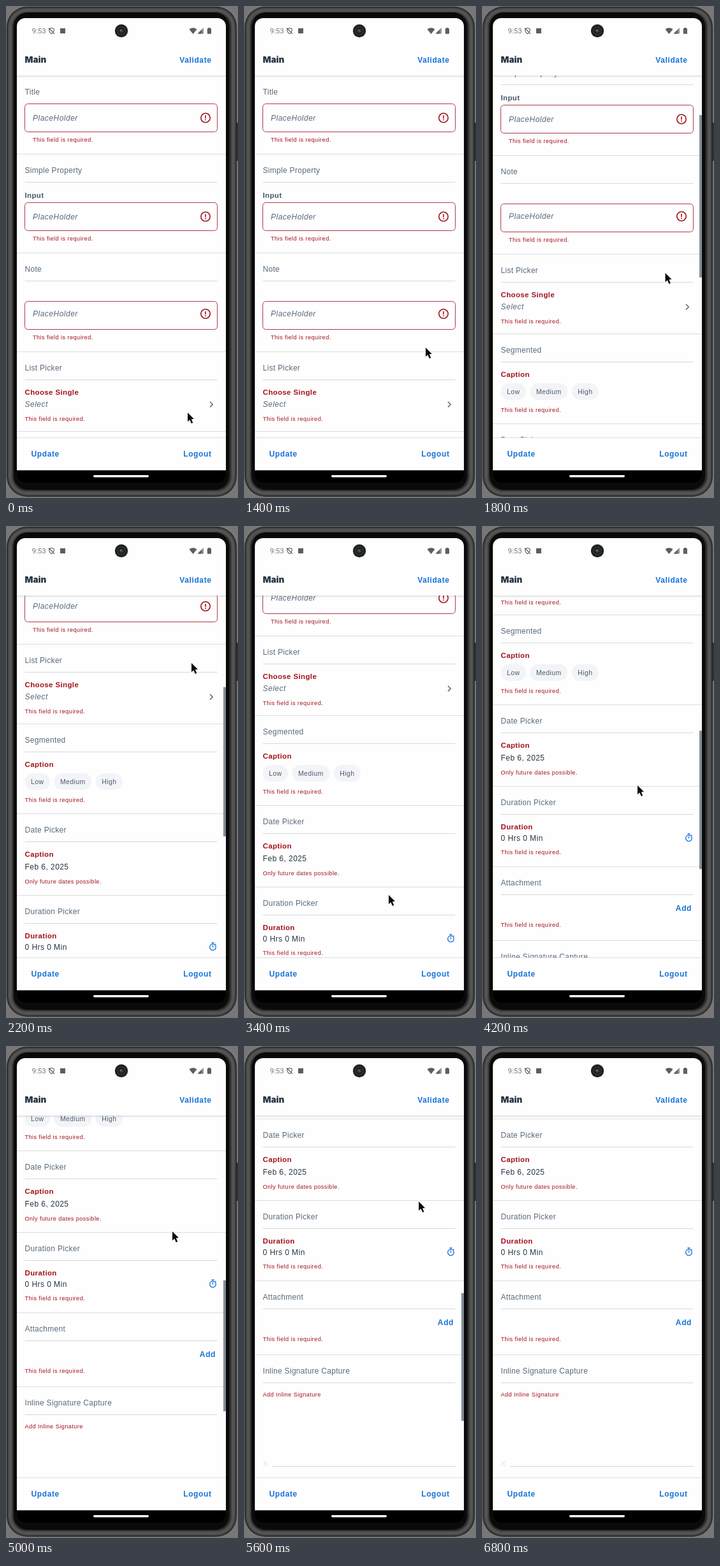
Write an HTML page with a canvas that moves like this. It is 364 by 772 pixels and loops after 8200 ms.

```html
<!DOCTYPE html>
<html lang="en">
<head>
<meta charset="utf-8">
<title>Form validation</title>
<style>
html, body { margin: 0; width: 100%; height: 100%; overflow: hidden; background: #777; }
canvas { display: block; width: 364px; height: 772px; }
</style>
</head>
<body>
<canvas id="stage"></canvas>
<script>
const W = 364, H = 772, LOOP = 8200, STEP = 200;
const LEFT = 17, WIDE = 328, PAD = 29.5, INNER = 302, TOP = 109, FOOT = 677;
const canvas = document.getElementById('stage');
const ctx = canvas.getContext('2d');
const dpr = window.devicePixelRatio || 1;
canvas.width = W * dpr;
canvas.height = H * dpr;

const RED = '#a2121c', BLUE = '#1672d6', INK = '#263442', SLATE = '#586a7c';
const GRAY = '#5c5f62', LINE = '#dcdde0';

const style = (size, spacing, look = '', family = '"Liberation Sans", Arial') =>
  ({ size, spacing: spacing + 'px', font: `${look} ${size}px ${family}, sans-serif` });
const TYPE = {
  head: style(13.5, 0, '900', 'Inter'),
  button: style(12, 0.6, 'bold'),
  title: style(12, 0.3),
  label: style(11.5, 0.37, 'bold'),
  value: style(12, 0.45),
  hint: style(12, 0.5, 'italic'),
  small: style(9.2, 0.43),
  pill: style(10.5, 0.4),
  clock: style(11.5, 0, '', 'Roboto')
};

// Pointer stops; "drag" means the button is held on the way there.
const STOPS = [
  { t: 0, x: 285, y: 638 },
  { t: 1400, x: 285, y: 536 },
  { t: 1500, x: 285, y: 572 },
  { t: 2200, x: 291, y: 215, drag: true },
  { t: 2400, x: 291, y: 215, drag: true },
  { t: 2600, x: 290, y: 202, drag: true },
  { t: 3400, x: 227, y: 579 },
  { t: 3600, x: 229, y: 565 },
  { t: 4200, x: 244, y: 407, drag: true },
  { t: 5000, x: 261, y: 291, drag: true },
  { t: 5400, x: 267, y: 241, drag: true },
  { t: 6700, x: 380, y: 290 }
];

const clamp = v => Math.min(1, Math.max(0, v));
const smooth = p => p * p * (3 - 2 * p);

// The page follows the pointer one to one while it drags.
function pose(time) {
  let { x, y } = STOPS[0], scroll = 0, lastDrag = -Infinity;
  STOPS.slice(1).forEach((stop, i) => {
    const from = STOPS[i];
    if (time < from.t) return;
    const p = clamp((time - from.t) / (stop.t - from.t));
    const k = stop.drag ? p : smooth(p);
    x = from.x + (stop.x - from.x) * k;
    y = from.y + (stop.y - from.y) * k;
    if (stop.drag) {
      scroll += from.y - y;
      lastDrag = Math.min(time, stop.t);
    }
  });
  return { x, y, scroll: Math.round(scroll), bar: clamp(1 - (time - lastDrag - 300) / 250) };
}

function rect(x, y, w, h, fill) {
  ctx.fillStyle = fill;
  ctx.fillRect(x, y, w, h);
}

function round(x, y, w, h, r, fill, stroke) {
  ctx.beginPath();
  ctx.roundRect(x, y, w, h, r);
  if (fill) { ctx.fillStyle = fill; ctx.fill(); }
  if (stroke) { ctx.strokeStyle = stroke; ctx.lineWidth = 1; ctx.stroke(); }
}

function circle(x, y, r, fill, stroke, width) {
  ctx.beginPath();
  ctx.arc(x, y, r, 0, Math.PI * 2);
  if (fill) { ctx.fillStyle = fill; ctx.fill(); }
  if (stroke) { ctx.strokeStyle = stroke; ctx.lineWidth = width; ctx.stroke(); }
}

function path(d, x, y, fill, stroke, width) {
  const p = new Path2D(d);
  ctx.save();
  ctx.translate(x, y);
  ctx.lineJoin = 'round';
  if (stroke) { ctx.strokeStyle = stroke; ctx.lineWidth = width; ctx.stroke(p); }
  if (fill) { ctx.fillStyle = fill; ctx.fill(p); }
  ctx.restore();
}

// y is the middle of the capitals
function text(str, x, y, type, color, align = 'left') {
  const { font, size, spacing } = TYPE[type];
  ctx.font = font;
  ctx.letterSpacing = spacing;
  ctx.fillStyle = color;
  ctx.textAlign = align;
  ctx.fillText(str, x, y + size * 0.36);
}

const label = str => text(str, PAD, 64, 'label', RED);
const value = (str, y) => text(str, PAD, y, 'value', INK);
const error = (y, str = 'This field is required.', x = PAD) => text(str, x, y, 'small', RED);

function field(y, mid = y + 22.5) {
  round(PAD, y + 0.5, INNER, 44, 5, null, '#ad3a4c');
  text('PlaceHolder', 42, mid, 'hint', SLATE);
  circle(313, mid, 7.2, null, RED, 1.6);
  rect(312.2, mid - 4, 1.6, 5, RED);
  rect(312.2, mid + 2.2, 1.6, 1.7, RED);
  error(y + 56.5, undefined, 42);
}

function pills(names, y) {
  let x = PAD;
  for (const name of names) {
    ctx.font = TYPE.pill.font;
    ctx.letterSpacing = TYPE.pill.spacing;
    const w = ctx.measureText(name).width + 19;
    round(x, y - 13, w, 26, 13, '#f3f4f7');
    text(name, x + 9.5, y, 'pill', '#4b5c6e');
    x += w + 6.5;
  }
}

function stopwatch(x, y) {
  circle(x, y + 0.8, 4.8, null, BLUE, 1.3);
  path('M-2-6h4M0-2v3.2M3.8-4.2l1.2 1.2', x, y, null, BLUE, 1.3);
}

const SECTIONS = [
  { title: 'Title', height: 123, plain: true, body() { field(44); } },
  { title: 'Simple Property', height: 155, body() {
    text('Input', PAD, 64.5, 'label', '#44566a');
    field(76);
  } },
  { title: 'Note', height: 155, body() { field(76, 96); } },
  { title: 'List Picker', height: 125, body() {
    label('Choose Single');
    text('Select', PAD, 83, 'hint', SLATE);
    path('M0-4.2L4.3 0L0 4.2', 320, 83.2, null, '#56677a', 1.5);
    error(106);
  } },
  { title: 'Segmented', height: 141, body() {
    label('Caption');
    pills(['Low', 'Medium', 'High'], 91);
    error(119.5);
  } },
  { title: 'Date Picker', height: 128, body() {
    label('Caption');
    value('Feb 6, 2025', 83.5);
    error(106.5, 'Only future dates possible.');
  } },
  { title: 'Duration Picker', height: 126, body() {
    label('Duration');
    value('0 Hrs 0 Min', 82);
    stopwatch(324.5, 81);
    error(103.5);
  } },
  { title: 'Attachment', height: 116, body() {
    text('Add', 329, 66, 'button', BLUE, 'right');
    error(92);
  } },
  { title: 'Inline Signature Capture', height: 200, body() {
    error(63, 'Add Inline Signature');
    text('X', PAD, 172, 'title', '#e3e5e8');
    rect(44, 175, 288, 1, '#d3d7e0');
  } }
];

function form(scroll) {
  ctx.save();
  ctx.beginPath();
  ctx.rect(LEFT, TOP, WIDE, FOOT - TOP);
  ctx.clip();
  ctx.translate(0, TOP - scroll);
  for (const { title, height, plain, body } of SECTIONS) {
    text(title, PAD, 26, 'title', SLATE);
    if (!plain) rect(PAD, 44, INNER, 1, '#d6d8dc');
    body();
    rect(LEFT, height, WIDE, 1, LINE);
    ctx.translate(0, height);
  }
  ctx.restore();
}

function scrollbar(scroll, alpha) {
  ctx.globalAlpha = alpha;
  rect(341, 110 + scroll * 0.4, 4, 270 - scroll * 0.1, '#858d96');
  ctx.globalAlpha = 1;
}

function phone() {
  rect(0, 0, W, H, '#777');
  rect(360, 183, 4, 60, '#303030');
  // metal rim: dark edge, lighter ridge, dark again
  for (let i = 0; i < 11; i++) {
    const shade = Math.round(38 + 48 * Math.sin(Math.PI * i / 10));
    round(1 + i, 1 + i, 361 - 2 * i, 769 - 2 * i, 32 - i, `rgb(${shade},${shade},${shade})`);
  }
  round(12, 10, 338, 749, 22, '#0a0a0a');
  round(LEFT, 19, WIDE, 729, 14, '#000');
  round(LEFT, 19, WIDE, 709.5, [13, 13, 0, 0], '#fefefe');
  round(137, 736, 87, 3.4, 1.7, '#f4f4f4');
}

function statusBar() {
  text('9:53', 40.5, 39, 'clock', '#75787b');
  path('M0-4.5L3.8-3Q4 2.5 0 4.6Q-4 2.5-3.8-3ZM-4.5-4.5L4.5 4.5', 71.5, 39, null, GRAY, 1.1);
  rect(85, 35, 8, 8, GRAY);

  circle(181, 39, 10.2, '#1d1f20');
  circle(181, 39, 6.2, null, '#303436', 1.5);
  circle(181, 39, 2.8, '#3d4447');
  circle(180.2, 38.2, 1, '#777f83');

  path('M0 0L-6-7.5Q0-12 6-7.5Z', 293.5, 44, GRAY);
  path('M0 0L9.5-9.5V0Z', 300.5, 43.5, '#8d9093');
  path('M0 0L6.5-6.5V0Z', 300.5, 43.5, GRAY);
  round(315.8, 35, 6.2, 8.8, 1, GRAY);
  rect(317.5, 34, 2.8, 1.2, GRAY);
}

function bars() {
  const shade = ctx.createLinearGradient(0, TOP - 1, 0, TOP + 4);
  shade.addColorStop(0, 'rgba(85,95,110,.24)');
  shade.addColorStop(1, 'rgba(85,95,110,0)');
  rect(LEFT, TOP, WIDE, 4, shade);
  text('Main', PAD, 84.5, 'head', INK);
  text('Validate', 322.5, 84.5, 'button', BLUE, 'right');
  rect(LEFT, FOOT, WIDE, 1, LINE);
  text('Update', 39.5, 703, 'button', BLUE);
  text('Logout', 322.5, 703, 'button', BLUE, 'right');
}

function draw(ms) {
  const { x, y, scroll, bar } = pose(Math.floor((ms % LOOP) / STEP) * STEP);
  ctx.setTransform(dpr, 0, 0, dpr, 0, 0);
  phone();
  statusBar();
  form(scroll);
  scrollbar(scroll, bar);
  bars();
  path('M0 0V14.2L3.3 11.2L5.8 17L8.3 15.9L5.8 10.3L10 10.1Z', x, y, '#080808', '#fff', 1.8);
}

const start = performance.now();
function tick() {
  draw(performance.now() - start);
  requestAnimationFrame(tick);
}
tick();
</script>
</body>
</html>
```
